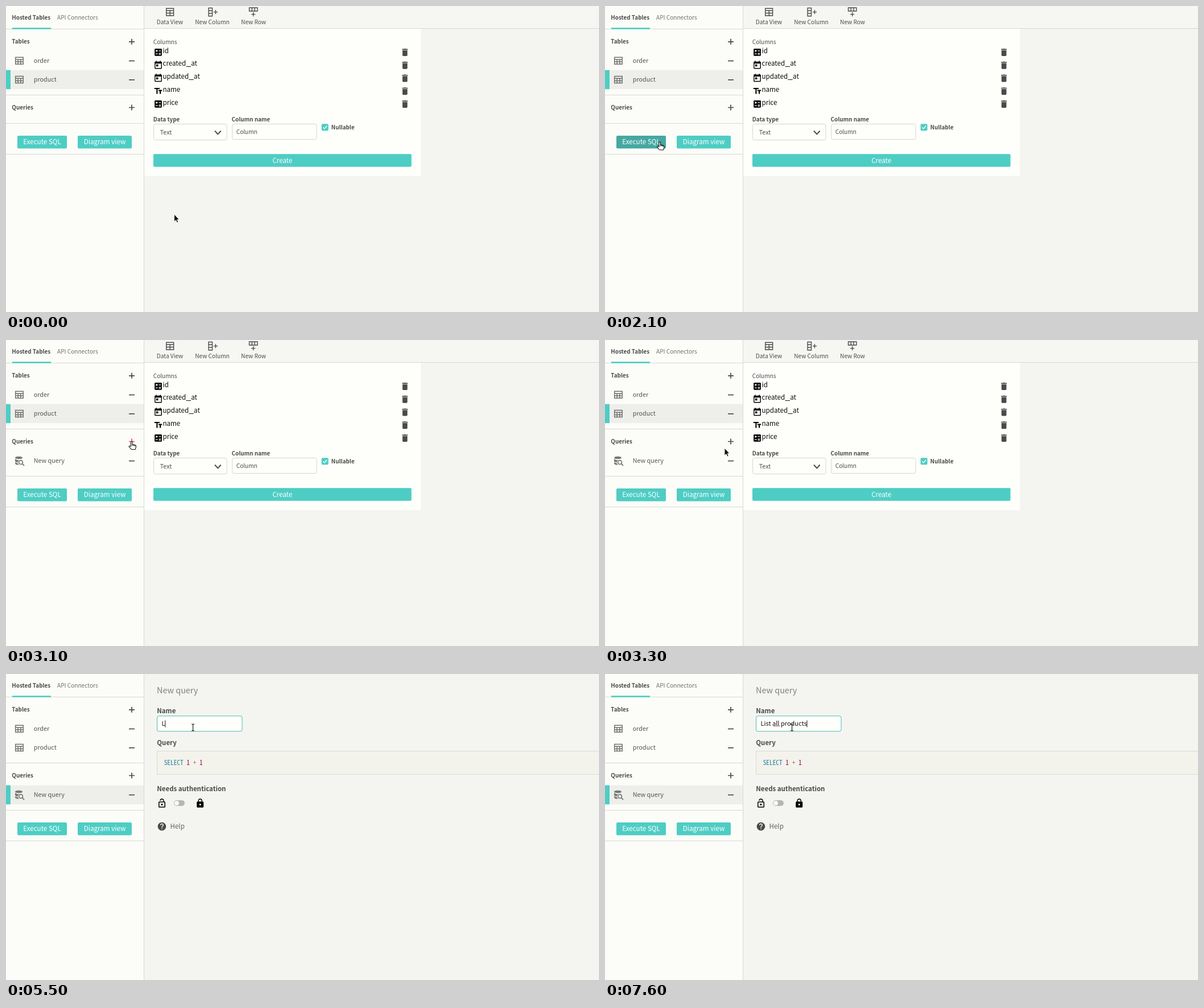
Recreate the animation shown at these times as an HTML page. Size 1042 px wide and 538 px high, loop 8000 ms.

```html
<!DOCTYPE html>
<html lang="en">
<head>
<meta charset="utf-8">
<title>Query editor</title>
<style>
  html, body { margin: 0; width: 100%; height: 100%; overflow: hidden; background: #f4f5f1; }
  svg { display: block; }
  svg.stage { width: 100%; height: 100%; }
  text { font: 10.1px "Noto Sans CJK JP", "Noto Sans CJK SC", "Noto Sans CJK", "Noto Sans", sans-serif; fill: #4a4a4a; white-space: pre; }
  .b text, text.b { font-weight: 700; font-size: 9.9px; }
  .mid { text-anchor: middle; }
  .item { font-size: 10.8px; fill: #555; }
  .btn rect { fill: #4ecdc4; }
  .btn.hot rect { fill: #45a8a1; }
  .btn text { font-size: 11.65px; fill: #fff; text-anchor: middle; }
  .cols text { font-size: 11.6px; font-weight: 500; fill: #0a0a0a; }
  .cols tspan { font-size: 16px; }
  .big text { font-size: 11.45px; font-weight: 700; }
  .code text { font: 11.33px "Noto Sans Mono CJK JP", "Noto Sans Mono CJK SC", "Liberation Mono", monospace; }
  .line { stroke: #d8d9d5; fill: none; }
  .box { fill: #fefffb; stroke: #d5d6d2; }
  .box.on { stroke: #4fb9b3; }
  .sign { stroke: #4a4a4a; stroke-width: 1.7; fill: none; }
  .sign.hot { stroke: #e0506a; }
  .grid { stroke: #707070; stroke-width: 1.5; fill: none; }
  .tool { stroke: #4a4a4a; stroke-width: 1.4; fill: none; }
</style>
</head>
<body>
<svg class="stage" viewBox="0 0 1042 538">
  <defs>
    <path id="table" d="M1 1.5H14.5V13.5H1ZM1 5.3H14.5M1 9.4H14.5M5.4 5.3V13.5M10.1 5.3V13.5"/>
    <path id="minus" d="M-5 0H5"/>
    <path id="plus" d="M-5 0H5M0-5V5"/>
    <symbol id="trash" viewBox="0 0 24 24"><path fill="#4a4a4a" d="M6 19c0 1.1.9 2 2 2h8c1.1 0 2-.9 2-2V7H6v12zM19 4h-3.5l-1-1h-5l-1 1H5v2h14V4z"/></symbol>
    <symbol id="number" viewBox="0 0 24 24"><rect x="3" y="3" width="18" height="18" rx="2"/><path stroke="#fff" stroke-width="1.7" d="M5.5 8.5H11M8.2 5.8V11.2M13.5 8.5H18.5M5.5 16H11M13.5 14.5H18.5M13.5 17.5H18.5"/></symbol>
    <symbol id="date" viewBox="0 0 24 24"><path d="M19 3h-1V1h-2v2H8V1H6v2H5c-1.1 0-2 .9-2 2v14c0 1.1.9 2 2 2h14c1.1 0 2-.9 2-2V5c0-1.1-.9-2-2-2zm0 16H5V8h14v11zM7 10h5v5H7z"/></symbol>
    <symbol id="letters" viewBox="0 0 24 24"><path d="M2.5 4v3h5v12h3V7h5V4h-13zm19 5h-9v3h3v7h3v-7h3V9z"/></symbol>
    <symbol id="unlocked" viewBox="0 0 24 24"><path d="M12 17c1.1 0 2-.9 2-2s-.9-2-2-2-2 .9-2 2 .9 2 2 2zm6-9h-1V6c0-2.76-2.24-5-5-5S7 3.24 7 6h1.9c0-1.7 1.4-3.1 3.1-3.1s3.1 1.4 3.1 3.1v2H6c-1.1 0-2 .9-2 2v10c0 1.1.9 2 2 2h12c1.1 0 2-.9 2-2V10c0-1.1-.9-2-2-2zm0 12H6V10h12v10z"/></symbol>
    <symbol id="locked" viewBox="0 0 24 24"><path d="M18 8h-1V6c0-2.76-2.24-5-5-5S7 3.24 7 6v2H6c-1.1 0-2 .9-2 2v10c0 1.1.9 2 2 2h12c1.1 0 2-.9 2-2V10c0-1.1-.9-2-2-2zm-6 9c-1.1 0-2-.9-2-2s.9-2 2-2 2 .9 2 2-.9 2-2 2zm3.1-9H8.9V6c0-1.7 1.4-3.1 3.1-3.1s3.1 1.4 3.1 3.1v2z"/></symbol>
    <symbol id="help" viewBox="0 0 24 24"><path fill="#4a4a4a" d="M12 2C6.5 2 2 6.5 2 12s4.5 10 10 10 10-4.5 10-10S17.5 2 12 2zm1 17h-2v-2h2v2zm2.07-7.75l-.9.92C13.45 12.9 13 13.5 13 15h-2v-.5c0-1.1.45-2.1 1.17-2.83l1.24-1.26c.37-.36.59-.86.59-1.41 0-1.1-.9-2-2-2s-2 .9-2 2H8c0-2.2 1.8-4 4-4s4 1.8 4 4c0 .88-.36 1.68-.93 2.25z"/></symbol>
  </defs>

  <rect width="1042" height="538" fill="#f4f5f1"/>

  <!-- Table view -->
  <g id="tableView">
    <rect x="243" width="799" height="39" fill="#f6f7f3"/>
    <path class="line" d="M243 39.5H1042"/>
    <rect x="243" y="40" width="486" height="259" fill="#fefffb"/>
    <g class="tool">
      <path d="M281.7 4.2H294.6V17H281.7ZM281.7 8H294.6M281.7 12.5H294.6M288.2 8V17"/>
      <path d="M356 3.5H362.5V17.8H356ZM356 8.2H362.5M356 13H362.5M364.8 10.6H372M368.4 7V14.2"/>
      <path d="M427.5 3H441.8V9H427.5ZM432.2 3V9M437 3V9M434.6 11V18.2M431 14.6H438.2"/>
    </g>
    <g class="mid">
      <text x="288" y="31.5">Data View</text>
      <text x="362.5" y="31.5">New Column</text>
      <text x="435" y="31.5">New Row</text>
    </g>
    <text x="258.7" y="66.5">Columns</text>
    <g class="cols" id="cols">
      <text x="275.5" y="83">id</text>
      <text x="275.5" y="105.3">created<tspan>_</tspan>at</text>
      <text x="275.5" y="128">updated<tspan>_</tspan>at</text>
      <text x="275.5" y="151">name</text>
      <text x="275.5" y="173.6">price</text>
    </g>
    <g class="b">
      <text x="258.7" y="202.7">Data type</text>
      <text x="396.5" y="203.3">Column name</text>
      <text x="571.5" y="217">Nullable</text>
    </g>
    <rect class="box" x="259.5" y="207.5" width="128.5" height="28" rx="3"/>
    <text x="270.8" y="226.3" font-weight="500" style="font-size:10.6px">Text</text>
    <path d="M367 219.5L372.3 225.3 377.6 219.5" fill="none" stroke="#4a4a4a" stroke-width="2"/>
    <rect class="box" x="397.5" y="207.5" width="148.5" height="27" rx="3"/>
    <text x="404.7" y="225" fill="#666">Column</text>
    <rect x="554.5" y="207.3" width="12" height="12" rx="2" fill="#4ecdc4"/>
    <path d="M557.3 213.4L559.7 215.8 564 210.8" fill="none" stroke="#fff" stroke-width="1.4"/>
    <g class="btn"><rect x="259" y="260.3" width="453.5" height="22.5" rx="2"/><text x="485.7" y="275.6">Create</text></g>
  </g>

  <!-- Query view -->
  <g id="queryView">
    <text x="265" y="34" style="font-size:14.4px;fill:#808080">New query</text>
    <g class="big">
      <text x="265.3" y="68.6">Name</text>
      <text x="265.3" y="124.6">Query</text>
      <text x="265.3" y="205.6">Needs authentication</text>
    </g>
    <rect id="field" class="box" x="265.5" y="73.8" width="149.5" height="27" rx="3"/>
    <rect id="selection" x="274" y="81" height="13" fill="#b5d7fb"/>
    <text id="value" class="item" x="273.5" y="91"></text>
    <path id="squiggle" d="M296 92.6l1.5-1.4 1.5 1.4 1.5-1.4 1.5 1.4 1.5-1.4 1.5 1.4 1.5-1.4 1.5 1.4" fill="none" stroke="#d33" stroke-width=".8"/>
    <rect id="caret" y="81.5" width="1" height="12" fill="#111"/>
    <rect x="265.5" y="135.5" width="790" height="41" fill="#f3f2eb" stroke="#dbdcd6"/>
    <g class="code">
      <rect x="328.5" y="150" width="7" height="12" fill="#f6f5f0"/>
      <text x="277.7" y="160"><tspan fill="#1e7f9c">SELECT</tspan> <tspan fill="#905">1</tspan> <tspan fill="#9a6e3a">+</tspan> <tspan fill="#905">1</tspan></text>
    </g>
    <use href="#unlocked" x="265" y="218.2" width="18" height="18"/>
    <rect x="295" y="222" width="19" height="10" rx="5" fill="#b5b6b3"/>
    <circle cx="300" cy="227" r="4" fill="#f8f9f5"/>
    <use href="#locked" x="332.2" y="218.2" width="18" height="18"/>
    <use href="#help" x="265.2" y="259.2" width="17.5" height="17.5"/>
    <text x="288.5" y="272.2" style="font-size:11.6px;fill:#606060">Help</text>
  </g>

  <!-- Sidebar -->
  <rect width="242" height="538" fill="#fcfdf8"/>
  <g id="active"><rect width="242" height="33.5" fill="#eeefeb"/><rect width="8" height="33.5" fill="#4ecdc4"/></g>
  <path class="line" d="M242.5 0V538M0 40.5H242M0 156.5H242"/>
  <rect x="11" y="38.2" width="68" height="2.6" fill="#4ecdc4"/>
  <g class="b">
    <text x="10.3" y="23.6">Hosted Tables</text>
    <text x="10.3" y="65.8">Tables</text>
    <text x="10.3" y="181.8">Queries</text>
  </g>
  <text x="90" y="23.6" style="fill:#707070">API Connectors</text>
  <use href="#plus" class="sign" x="221" y="62.8"/>
  <use href="#plus" class="sign" id="addQuery" x="221" y="178.5"/>
  <use href="#table" class="grid" x="15.7" y="88.7"/>
  <text class="item" x="48.7" y="100">order</text>
  <use href="#minus" class="sign" x="221" y="96.5"/>
  <use href="#table" class="grid" x="15.7" y="122"/>
  <text class="item" x="48.7" y="133.3">product</text>
  <use href="#minus" class="sign" x="221" y="129.8"/>
  <g id="queryRow">
    <path fill="#777" d="M16 207c0-3 13-3 13 0s-13 3-13 0ZM16 209q3 2.4 7 2.2-2.600 1.800-2.400 4.300-4-.6-4.600-2.500ZM16 214.700q1.500 1.700 4.900 2l1.600 3q-6 0-6.500-2.600Z"/>
    <circle cx="26" cy="215" r="3.400" fill="none" stroke="#777" stroke-width="1.700"/>
    <path d="M28.300 217.300L32 221" stroke="#777" stroke-width="1.800"/>
    <text class="item" x="48.700" y="216">New query</text>
    <use href="#minus" class="sign" x="221" y="212.600"/>
  </g>
  <g id="foot">
    <path class="line" d="M0 206.500H242M0 260.500H242"/>
    <g class="btn" id="execute"><rect x="20" y="228" width="87" height="22.500" rx="2"/><text x="63.500" y="243.200">Execute SQL</text></g>
    <g class="btn"><rect x="126" y="228" width="95" height="22.500" rx="2"/><text x="173.500" y="243.200">Diagram view</text></g>
  </g>

  <!-- Pointer shapes, hotspot at 0,0 -->
  <g id="pointer">
    <path id="arrow" d="M0 0V13.200L3 10.500 5 15 7.200 14 5.200 9.700H9Z" fill="#111" stroke="#fff" stroke-width=".9"/>
    <path id="hand" d="M-1.500 8V.8a1.300 1.300 0 0 1 2.600 0V4.600l5 1.200q1.500.4 1.400 1.900l-.5 3.200-1 2.600H-.6L-4.800 8.700q-.4-1.600 1.400-1.300ZM1.100 4.600V7M3.400 5.200V7.300M5.600 5.700V7.800" fill="#fff" stroke="#111" stroke-width="1.100" stroke-linejoin="round"/>
    <path id="beam" d="M-2.500-6Q0-6 0-4.500V4.500Q0 6-2.500 6M2.500-6Q0-6 0-4.500M0 4.500Q0 6 2.500 6" fill="none" stroke="#222" stroke-width="1.200"/>
  </g>
</svg>
<script>
const $ = id => document.getElementById(id);
const LOOP = 8000, NEW_ROW = 3000, OPEN = 3600, FOCUS = 4200, TYPE = 5500;
const PHRASE = 'List all products';

// time, shape, x, y
const path = [
  [0, 'arrow', 295.5, 366], [200, 'arrow', 300, 338], [400, 'arrow', 290, 352],
  [500, 'arrow', 250, 345], [600, 'arrow', 205, 330], [700, 'arrow', 160, 315],
  [800, 'arrow', 115, 300], [900, 'arrow', 89, 292], [1100, 'arrow', 76, 270],
  [1200, 'arrow', 66, 260], [1400, 'hand', 67, 248], [1500, 'hand', 68, 244],
  [1600, 'hand', 69, 241], [1700, 'hand', 68, 240], [1900, 'hand', 70, 241],
  [2100, 'hand', 96.5, 239.5], [2200, 'hand', 104, 232], [2300, 'arrow', 120, 222],
  [2400, 'arrow', 142, 212], [2500, 'arrow', 164, 203], [2600, 'arrow', 185, 194],
  [2700, 'arrow', 202, 186], [2800, 'hand', 216, 178], [2900, 'hand', 221, 175],
  [3100, 'hand', 221, 179], [3300, 'arrow', 210, 190], [3400, 'hand', 180, 203],
  [3500, 'hand', 142, 211], [3600, 'hand', 118, 213], [3700, 'hand', 150, 210],
  [3800, 'hand', 222, 200], [3900, 'beam', 289, 188.5], [4000, 'beam', 279, 140],
  [4100, 'beam', 274, 97]
];
// dragging over the name selects it
for (let i = 0; i < 8; i++) path.push([FOCUS + i * 100, 'beam', 274 + i * 7.79, 97 - i * .43]);

// time, number of typed letters
const typing = [
  [0, 0], [5500, 1], [5600, 2], [5700, 3], [5900, 4], [6000, 5], [6200, 6], [6300, 7],
  [6500, 8], [6600, 9], [6700, 10], [6800, 12], [7000, 13], [7100, 14], [7200, 15],
  [7400, 16], [7600, 17]
];

const latest = (keys, t) => keys.findLast(k => k[0] <= t);
const show = (id, on) => $(id).setAttribute('display', on ? 'inline' : 'none');
const move = (id, x, y) => $(id).setAttribute('transform', `translate(${x} ${y})`);

const icons = ['number', 'date', 'date', 'letters', 'number'];
$('cols').insertAdjacentHTML('beforeend', icons.map((icon, i) => {
  const y = 81.3 + i * 22.75;
  return `<use href="#${icon}" x="259" y="${y - 8.5}" width="17" height="17"/>
    <use href="#trash" x="692.3" y="${y - 8.6}" width="17.4" height="17.4"/>`;
}).join(''));

function draw(t) {
  const [, shape, x, y] = latest(path, t);
  const opened = t >= OPEN, focused = t >= FOCUS, typed = t >= TYPE;

  show('tableView', !opened);
  show('queryView', opened);
  show('queryRow', t >= NEW_ROW);
  move('foot', 0, t >= NEW_ROW ? 33 : 0);
  move('active', 0, opened ? 195.7 : 112.7);
  $('execute').classList.toggle('hot', t >= 1400 && t < 2300);
  $('addQuery').classList.toggle('hot', t >= 2800 && t < 3300);

  const value = $('value');
  const count = latest(typing, t)[1];
  value.textContent = typed ? PHRASE.slice(0, count) : 'New query';
  value.style.fill = focused ? '#111' : '#555';
  value.style.fontSize = typed ? '11px' : '10.8px';
  $('field').classList.toggle('on', focused);
  show('selection', focused && !typed);
  $('selection').setAttribute('width', Math.max(0, Math.min(53, x - 274)));
  show('caret', typed);
  if (typed) $('caret').setAttribute('x', 273.2 + value.getComputedTextLength());
  show('squiggle', count > 8);

  for (const id of ['arrow', 'hand', 'beam']) show(id, id === shape);
  move('pointer', x, y);
}

function tick(now) {
  draw(now % LOOP);
  requestAnimationFrame(tick);
}
requestAnimationFrame(tick);
</script>
</body>
</html>
```
